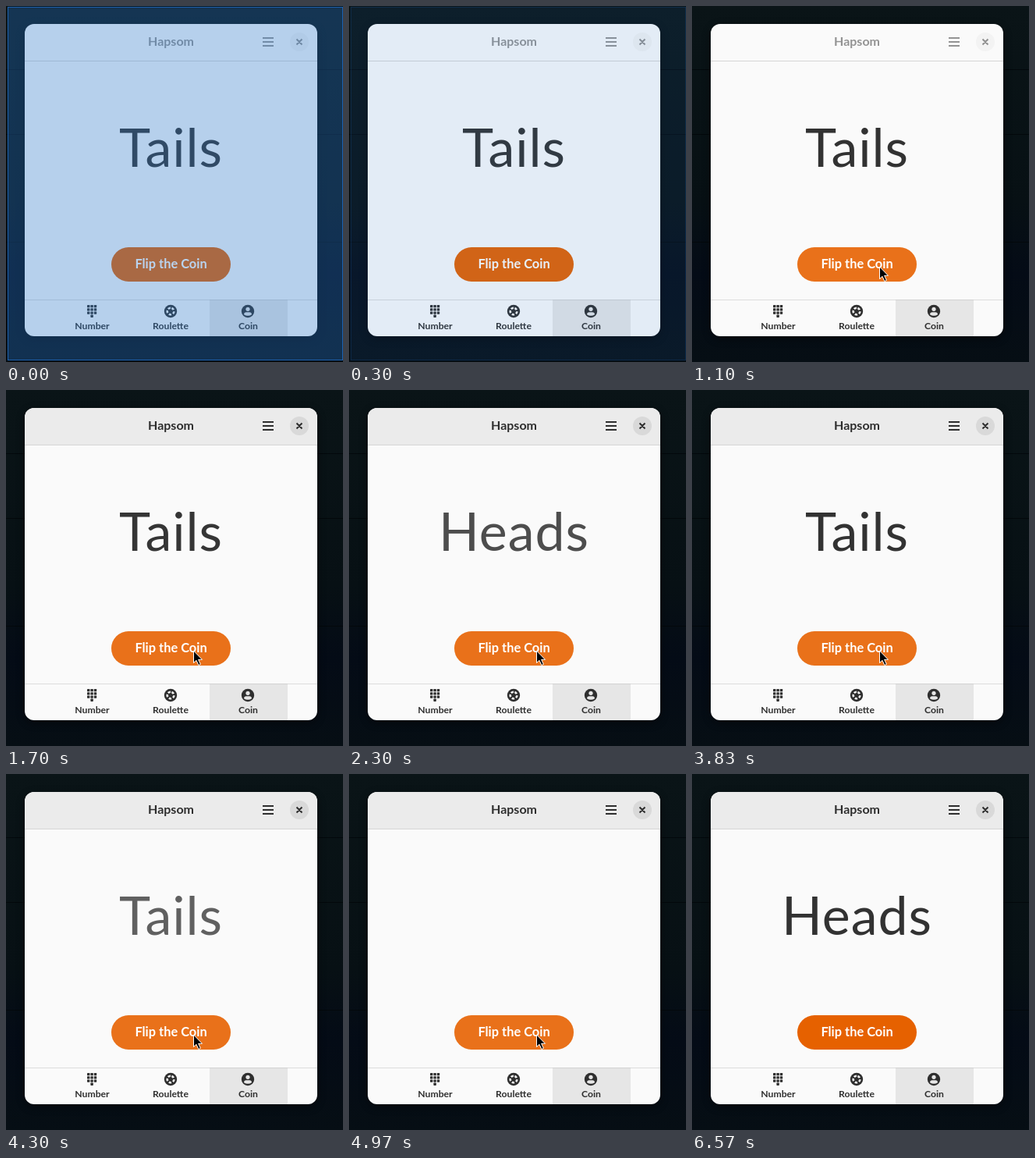
An HTML page that plays this animation: 432 px wide and 456 px high, repeating every 6.7 s.

```html
<!DOCTYPE html>
<html lang="en">
<head>
<meta charset="utf-8">
<title>Coin flip</title>
<style>
  html, body { margin: 0; overflow: hidden; background: #050c12; }
  svg { display: block; width: 432px; height: 456px; }
  text { font-family: Lato, "Open Sans", sans-serif; font-weight: 700; text-anchor: middle; }
  .tab { font-size: 12.2px; fill: #2e2e2e; }
  #side { font-size: 68px; font-weight: 400; letter-spacing: 1px; fill: #323232; }
</style>
</head>
<body>
<svg viewBox="0 0 432 456">
  <defs>
    <linearGradient id="night" x2="0" y2="1">
      <stop offset="0" stop-color="#0a1417"/>
      <stop offset=".55" stop-color="#071014"/>
      <stop offset=".75" stop-color="#040b16"/>
      <stop offset="1" stop-color="#060e14"/>
    </linearGradient>
    <filter id="blur" x="-10%" y="-10%" width="120%" height="120%"><feGaussianBlur stdDeviation="6"/></filter>
    <clipPath id="frame"><rect x="24" y="23" width="375" height="400" rx="12"/></clipPath>
  </defs>

  <rect width="432" height="456" fill="url(#night)"/>
  <path d="M0 81.500H432M0 164.500H432M0 302.500H432" stroke="#03080b"/>
  <rect x="24" y="26" width="375" height="400" rx="12" opacity=".45" filter="url(#blur)"/>

  <g clip-path="url(#frame)">
    <rect x="24" y="23" width="375" height="400" fill="#fafafa"/>
    <rect id="bar" x="24" y="23" width="375" height="47" fill="#ebebeb"/>
    <path d="M24 70.500H399" stroke="#d6d6d6"/>
    <path d="M24 376.500H399" stroke="#dcdcdc"/>
    <rect x="261" y="376" width="100" height="47" fill="#e6e6e6"/>
    <path d="M261 376.500H361" stroke="#d2d2d2"/>
  </g>

  <circle id="close" cx="376" cy="46" r="12" fill="#d9d9d9"/>
  <g id="head">
    <text x="211.500" y="51" font-size="16" fill="#2e2e2e">Hapsom</text>
    <path d="M329 41H343M329 46H343M329 51H343M372.500 42.500l7 7m0-7l-7 7" stroke="#2e2e2e" stroke-width="2"/>
  </g>

  <text id="side" x="211.500" y="206"></text>

  <rect x="135" y="309" width="153" height="44" rx="22" fill="#e66100"/>
  <rect id="glow" x="135" y="309" width="153" height="44" rx="22" fill="#fff"/>
  <text x="211.500" y="336" font-size="16.400" fill="#fff">Flip the Coin</text>

  <g id="dots" fill="#2e2e2e"></g>
  <g fill="#2e2e2e">
    <circle cx="211" cy="391" r="8.200"/>
    <circle cx="211" cy="391" r="4.300" fill="none" stroke="#fafafa" stroke-width="2.600"
      stroke-dasharray="3.300 2.104" transform="rotate(-72 211 391)"/>
    <circle cx="310" cy="391" r="8.200"/>
    <circle cx="310" cy="388.300" r="2.600" fill="#e6e6e6"/>
    <path d="M305 395.200q0-3 3-3h4q3 0 3 3q-5 3.200-10 0z" fill="#e6e6e6"/>
  </g>
  <text class="tab" x="110.500" y="414">Number</text>
  <text class="tab" x="211" y="414">Roulette</text>
  <text class="tab" x="310.500" y="414">Coin</text>

  <path id="cursor" d="M240.500 334v15.500l3.500-3.200 2.800 6.200 2.600-1.200-2.800-6h4.900z"
    fill="#000" stroke="#fff"/>

  <rect id="select" x="2.500" y="1.500" width="429" height="452"
    fill="#2c7acf" fill-opacity=".33" stroke="#1d62b0"/>
</svg>

<script>
const LOOP = 6700, STEP = 1000 / 15;
const $ = id => document.getElementById(id);
const ramp = (t, start, len) => Math.min(1, Math.max(0, (t - start) / len));
const easeOut = p => 1 - (1 - p) ** 3;
const fade = (id, value) => $(id).setAttribute("opacity", value);

// Start of each flip and the side it lands on
const flips = [[1105, "Tails"], [1800, "Heads"], [2800, "Tails"], [3835, "Tails"], [4720, "Heads"]];
const OUT = 200, SWAP = 330, IN = 350;

for (let i = 0; i < 10; i++) {
  const col = i < 9 ? i % 3 : 1, row = Math.floor(i / 3);
  $("dots").innerHTML +=
    `<rect x="${104 + col * 4.4}" y="${383 + row * 4.2}" width="3.400" height="3.300" rx=".6"/>`;
}

function drawSide(t) {
  let side = "Tails", alpha = 1;
  for (const [start, next] of flips) {
    const dt = t - start;
    if (dt < 0) break;
    if (dt < SWAP) {
      alpha = 1 - ramp(dt, 0, OUT);
    } else {
      side = next;
      alpha = easeOut(ramp(dt, SWAP, IN));
    }
  }
  $("side").textContent = side;
  fade("side", alpha);
}

function draw(now) {
  const time = now % LOOP;
  const t = time < 95 ? 0 : 100 + Math.floor((time - 95) / STEP) * STEP;
  const focus = easeOut(ramp(t, 1105, 200));
  const pointing = t > 560 && t < 6560;

  fade("select", 1 - ramp(t, 50, 380));
  fade("bar", focus);
  fade("head", 0.5 + 0.5 * focus);
  fade("close", 0.2 + 0.8 * focus);
  fade("cursor", pointing ? 1 : 0);
  fade("glow", pointing ? 0.1 * easeOut(ramp(t, 510, 200)) : 0);
  drawSide(t);
}

const begin = performance.now();
function tick() {
  draw(performance.now() - begin);
  requestAnimationFrame(tick);
}
tick();
</script>
</body>
</html>
```
